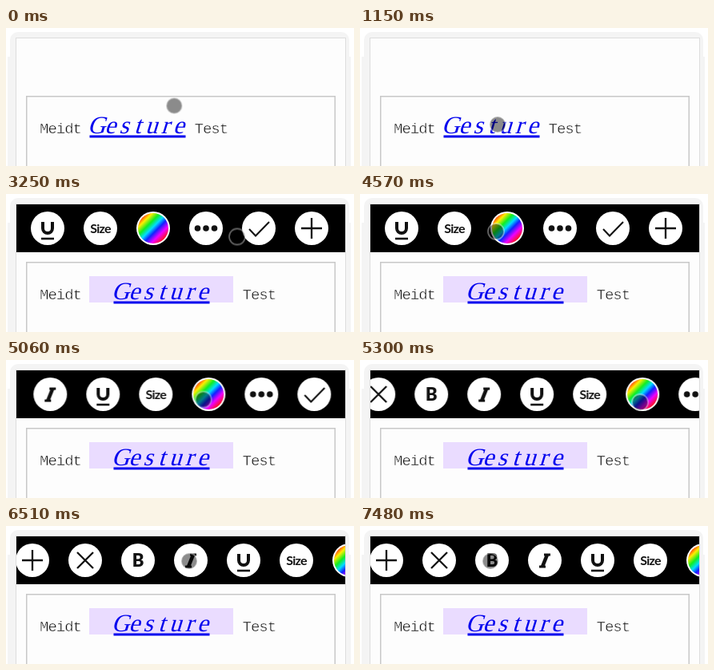
An HTML page for the animation above (8 s loop, 435 px wide and 173 px high).

```html
<!DOCTYPE html>
<html lang="en">
<head>
<meta charset="utf-8">
<title>Gesture toolbar</title>
<style>
  html, body { margin: 0; width: 100%; height: 100%; overflow: hidden; background: #fff; }
  svg { display: block; }
  .plain {
    font: 19px "Liberation Mono", monospace; letter-spacing: -1px;
    fill: #111; stroke: #fdfdfd; stroke-width: .5px;
  }
  .link { font: 31px "Liberation Serif", serif; text-anchor: middle; fill: #00e; }
  .icon text { font: 900 22px Lato, sans-serif; text-anchor: middle; fill: #111; }
  .icon .size { font-size: 16px; font-weight: 700; letter-spacing: -.7px; }
  .icon path { fill: none; stroke: #111; }
</style>
</head>
<body>
<svg width="435" height="173" viewBox="0 0 435 173">
  <defs>
    <linearGradient id="rainbow" x1=".12" y1=".12" x2=".88" y2=".88">
      <stop offset="0" stop-color="#f21"/>
      <stop offset=".15" stop-color="#fe0"/>
      <stop offset=".32" stop-color="#1e2"/>
      <stop offset=".47" stop-color="#0df"/>
      <stop offset=".61" stop-color="#12f"/>
      <stop offset=".78" stop-color="#e0f"/>
      <stop offset=".96" stop-color="#f12"/>
    </linearGradient>
    <clipPath id="barClip"><rect x="13" y="13" width="411" height="60"/></clipPath>
  </defs>

  <rect x="5" y="5" width="424" height="190" rx="10" fill="#f4f4f4"/>
  <rect x="2" y="36" width="429" height="150" fill="#f4f4f4"/>
  <rect x="12.5" y="12.5" width="412" height="180" fill="#fdfdfd" stroke="#ddd"/>
  <rect x="25.75" y="85.75" width="385.5" height="120" fill="#fdfdfd" stroke="#c8c8c8" stroke-width="1.5"/>

  <rect id="mark" x="104" y="103" width="180" height="33" fill="#eadcff"/>
  <text class="plain" x="42" y="132">Meidt</text>
  <g id="link">
    <text id="word" class="link" transform="translate(104.5 131.5) skewX(-17)">Gesture</text>
    <rect x="104.5" y="134.5" width="120" height="3" fill="#00e"/>
  </g>
  <text id="tail" class="plain" x="235.5" y="132">Test</text>

  <g id="bar" clip-path="url(#barClip)">
    <rect x="13" y="13" width="411" height="60"/>
    <g id="strip"></g>
  </g>
  <circle id="dot" r="10" fill="#000" fill-opacity=".45" stroke="#fff" stroke-opacity=".38" stroke-width="1.8"/>
</svg>
<script>
const LOOP = 8000, OPEN = 1390, GAP = 66, CELL = 17.1;
const $ = id => document.getElementById(id);

// Centre each letter of the link in a cell of equal width
const word = $('word');
word.setAttribute('x', [...word.textContent].map((_, i) => (i + .5) * CELL).join(' '));

const glyphs = {
  plus: '<path d="M-13 0H13M0-13V13" stroke-width="2.3"/>',
  cross: '<path d="M-10-10 10 10M10-10-10 10" stroke-width="2.3"/>',
  bold: '<text y="8">B</text>',
  italic: '<path d="M-1-7H7M-7 8H1" stroke-width="3"/><path d="M3-7-3 8" stroke-width="4.6"/>' +
    '<rect id="tap" x="-21" y="-21" width="42" height="42" fill="#33b5e5" fill-opacity=".4"/>',
  under: '<path d="M-6-8V0A6 6 0 0 0 6 0V-8" stroke-width="4"/><path d="M-8 13H8" stroke-width="2.6"/>',
  size: '<text class="size" y="5.5">Size</text>',
  color: '<circle r="19" fill="url(#rainbow)"/>',
  more: [-10.5, 0, 10.5].map(x => `<circle cx="${x}" r="3.8" fill="#111"/>`).join(''),
  check: '<path d="M-12 1-4 9.5 13-8" stroke-width="2.1"/>'
};
const order = [...Object.keys(glyphs), 'plus'];
$('strip').innerHTML = order.map((name, i) =>
  `<g class="icon" transform="translate(${52 + GAP * (i - 4)} 43)">
    <circle r="21" fill="#fff"/>${glyphs[name]}</g>`).join('');

// Rows: [time, value, easing to the next row]
function play(el, prop, rows, easing = 'linear') {
  const frames = rows.map(([t, v, e]) => ({ offset: t / LOOP, [prop]: v, easing: e || easing }));
  frames.push({ ...frames[frames.length - 1], offset: 1 });
  el.animate(frames, { duration: LOOP, iterations: Infinity });
}
const move = (x, y = 0) => `translate(${x}px, ${y}px)`;
const jump = (el, prop, rows) => play(el, prop, rows, 'step-end');

for (const id of ['bar', 'mark']) jump($(id), 'opacity', [[0, 0], [OPEN, 1]]);
jump($('link'), 'transform', [[0, move(0)], [OPEN, move(30)]]);
jump($('tail'), 'transform', [[0, move(0)], [OPEN, move(60)]]);
jump($('tap'), 'opacity', [[0, 0], [6120, 1], [6400, 0]]);

play($('strip'), 'transform', [
  [0, 0], [4850, 0, 'ease-in'], [5080, 80], [5300, 169, 'ease-out'], [5420, 178],
  [6100, 178], [6270, 211, 'ease-out'], [6510, 245]
].map(([t, x, e]) => [t, move(x), e]));

play($('dot'), 'transform', [
  [0, 210.3, 97.5], [460, 210.3, 97.5, 'ease-in-out'], [1150, 172, 121],
  [2340, 172, 121], [2400, 171, 120, 'ease-in-out'], [3140, 288, 52.5],
  [3250, 289, 53.5], [3330, 286, 53, 'ease-in-out'], [3600, 305, 52],
  [4050, 305, 52, 'ease-in-out'], [4570, 170, 47],
  [4840, 170, 47, 'ease-in'], [5080, 258, 50], [5300, 350, 53, 'ease-out'], [5420, 356, 54.5],
  [5690, 356, 54.5, 'ease-in-out'], [5910, 151, 42],
  [6090, 151, 42], [6270, 203.5, 43, 'ease-out'], [6510, 229, 44],
  [6910, 229, 44, 'ease-in-out'], [7180, 147, 46],
  [7330, 147, 46, 'ease-out'], [7480, 163, 44]
].map(([t, x, y, e]) => [t, move(x, y), e]));
</script>
</body>
</html>
```
